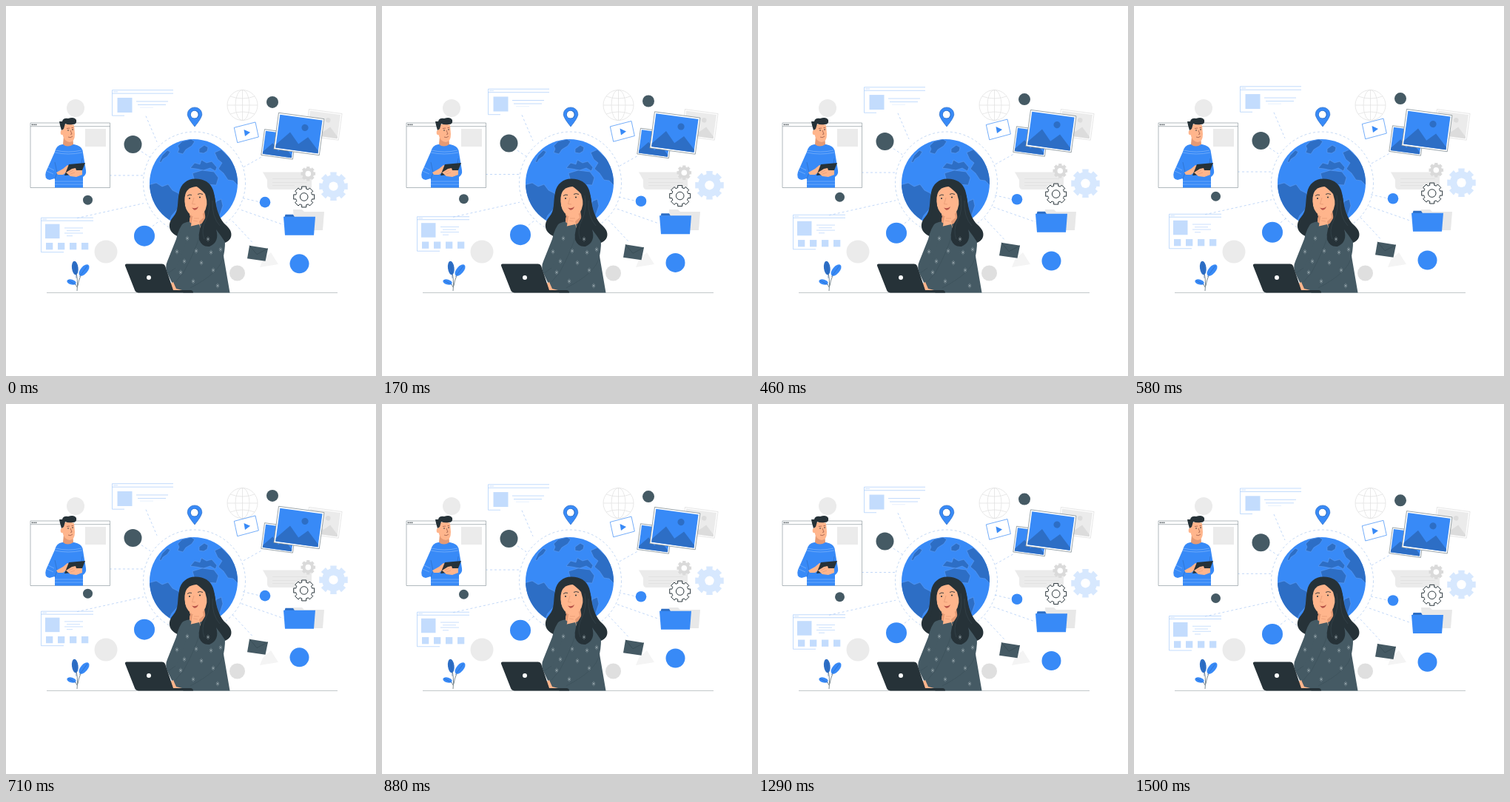
These frames come from a looping animation (500 by 500 pixels, 1.54 s). An HTML page with a canvas:

```html
<!DOCTYPE html>
<html lang="en">
<head>
<meta charset="utf-8">
<title>Connected world</title>
<style>
html, body { margin: 0; width: 100%; height: 100%; overflow: hidden; background: #fff; }
canvas { display: block; width: 500px; height: 500px; }
</style>
</head>
<body>
<canvas id="stage" width="500" height="500"></canvas>
<script>
const ctx = document.getElementById('stage').getContext('2d');
const LOOP = 1540, LOWEST = 1500, RISE = 6.5;
const BLUE = '#388af7', DEEP = '#2d6ec5', PALE = '#c3dcfd', MIST = '#d7e8fe', THIN = '#a8ccfb';
const SLATE = '#455a64', INK = '#263238', GREY = '#ebebeb', MID = '#dfdfdf';
const SKIN = '#ffb58c', SHADE = '#e59a74', WHITE = '#fff';

function paint(path, color, line, width = 0.7) {
  if (color) { ctx.fillStyle = color; ctx.fill(path); }
  if (line) { ctx.strokeStyle = line; ctx.lineWidth = width; ctx.stroke(path); }
}
const shape = (d, color, line, width) => paint(new Path2D(d), color, line, width);

function oval(x, y, rx, ry, turn, color, line, width) {
  const p = new Path2D();
  p.ellipse(x, y, rx, ry, turn, 0, Math.PI * 2);
  paint(p, color, line, width);
}
const disc = (x, y, r, color, line, width) => oval(x, y, r, r, 0, color, line, width);

function box(x, y, w, h, color, line, width) {
  const p = new Path2D();
  p.rect(x, y, w, h);
  paint(p, color, line, width);
}

function placed(x, y, angle, draw) {
  ctx.save();
  ctx.translate(x, y);
  ctx.rotate(angle);
  draw();
  ctx.restore();
}

function dashed(draw) {
  ctx.save();
  ctx.setLineDash([3, 3]);
  draw();
  ctx.restore();
}

function gear(x, y, r, hole, color, line) {
  const p = new Path2D();
  const root = r * 0.79, step = Math.PI / 4;
  for (let i = 0; i < 8; i++) {
    const a = i * step;
    for (const [turn, rad] of [[-0.26, root], [-0.22, r], [0.22, r], [0.26, root]])
      p.lineTo(Math.cos(a + turn) * rad, Math.sin(a + turn) * rad);
    p.arc(0, 0, root, a + 0.26, a + step - 0.26);
  }
  p.closePath();
  placed(x, y, 0, () => {
    ctx.lineJoin = 'round';
    paint(p, color, line, 1);
    disc(0, 0, hole, WHITE, line, 1);
  });
}

function photo(x, y, w, h, fill, hill, edge) {
  placed(x, y, 0.135, () => {
    box(0, 0, w, h, WHITE, edge, 0.7);
    const m = 1 + w * 0.018;
    const innerW = w - 2 * m, innerH = h - 2 * m;
    box(m, m, innerW, innerH, fill);
    ctx.translate(m, h - m);
    const at = (u, v) => `${u * innerW} ${-v * innerH}`;
    shape(`M${at(0, 0)}L${at(0, 0.1)}L${at(0.29, 0.52)}L${at(0.52, 0.2)}L${at(0.72, 0.44)}L${at(1, 0.08)}L${at(1, 0)}Z`, hill);
    disc(innerW * 0.62, -innerH * 0.71, w * 0.074, hill);
  });
}

function backdrop() {
  shape('M55 387.5H448', null, '#b3babd', 0.8);
  disc(94, 138, 12, GREY);
  disc(135, 332, 15.5, GREY);
  disc(312.5, 361, 10.5, MID);
  disc(319.5, 134, 20.5, null, MID, 0.7);
  oval(319.5, 134, 9.5, 20.5, 0, null, MID, 0.7);
  shape('M319.5 113.5V154.5M299 134H340M303 122Q319.5 128 336 122M303 146Q319.5 140 336 146', null, MID, 0.7);
  photo(409.5, 139.5, 45, 36, GREY, '#dcdcdc', '#dddddd');
  shape('M347 224.5H413V244Q413 248 409 248H358Q353 248 353 243V235Z', GREY);
  shape('M360 233.5H407M360 238.5H407M360 242.5H390', null, '#dfdfdf', 0.7);
  shape('M388 275H400L403 278H430L428 303H390Z', '#e8e8e8');
  shape('M358 333L368 349L343 353L347 343Z', '#f4f4f4');
  dashed(() => disc(254.5, 239, 69, null, '#b3cdf0', 0.8));
}

function globe() {
  ctx.save();
  disc(253.5, 239.5, 59.5, BLUE);
  const p = new Path2D();
  p.arc(253.5, 239.5, 59.5, 0, Math.PI * 2);
  ctx.clip(p);
  [
    'M232 189L238 183L250 180L255 183L251 189L243 194L239 200L232 198L234 193Z',
    'M207 211L211 202L218 195L222 197L218 203L212 207L210 211Z',
    'M192 242L203 239L211 244L219 241L225 249L233 253L237 260L233 273L224 283L219 294L207 282L195 262Z',
    'M261 193L268 188L273 191L272 196L267 199L261 198Z',
    'M249 219L255 212L262 214L264 208L271 212L278 210L285 218L283 223L276 219L267 222L257 220Z',
    'M252 226L265 222L281 224L287 232L284 242L256 240Z',
    'M282 198L291 194L306 209L314 225L315 244L307 236L300 235L294 226L287 220L292 212L286 207Z',
    'M284 264L291 261L293 270L288 285L283 278Z'
  ].forEach(d => shape(d, DEEP, '#66a3f7', 0.5));
  ctx.restore();
}

function locationPin() {
  shape('M255 163Q246 152 245.200 147C245.200 133.700 264.800 133.700 264.800 147Q264 152 255 163Z', BLUE, DEEP, 0.7);
  disc(255, 146.700, 5.800, DEEP);
  disc(254.700, 146.700, 4.900, WHITE);
}

function man() {
  box(33, 158, 107.5, 87.5, WHITE, '#7d8a90', 0.6);
  shape('M33 162.700H140.500', null, '#7d8a90', 0.6);
  [35.5, 38, 40.5].forEach(x => disc(x, 160.400, 0.8, INK));
  box(107, 166, 28, 24, GREY);
  shape('M76 187Q68 188 66 197L54 224Q51 234 59 235L66 233V245.500H104V231Q109 228 108 222L103.500 195Q102 189 92 187Z', BLUE);
  shape('M67 195Q84 199 102 195M66 198Q84 202 103 198M66 237H104M66 241H104', null, '#8dbcfa', 0.6);
  shape('M66 211L69 225L66 234M103 206L102 214', null, DEEP, 0.7);
  shape('M57 218L65 222M55 223L64 227', null, '#8dbcfa', 0.6);
  shape('M78 176L77 187Q83 192 91 187L90 175Z', SHADE);
  shape('M76 162Q82 157 92 161L93 173Q93 184 86 184Q78 183 76 172Z', SKIN);
  oval(76, 171, 2.300, 3.300, 0, SKIN);
  shape('M75 168L73 161L72 156L76 156Q77 151 84 152Q92 149 95 154Q96 160 90 160Q84 161 80 159L78 166Z', INK);
  disc(84, 168, 0.8, INK);
  disc(90, 167, 0.8, INK);
  shape('M82 165.500L86 165M88.500 164.500L91 164.500M87 168L89 173L87 173.500M84 177Q87 179 90 176', null, '#8f4f40', 0.7);
  shape('M68 225L77 220L83 215L88 217L84 223L77 228L70 228Z', SKIN);
  shape('M85 214L107 212L101 227L79 229Z', INK);
  shape('M81 225L89 220L94 219L95 222L103 222L103 228L95 231L87 230Z', SKIN);
  shape('M85 225L91 222M87 227L93 225', null, SHADE, 0.7);
}

function plant() {
  shape('M96 385Q98 369 93 352M97 378Q99 364 108 354M96 380Q94 374 86 372', null, SLATE, 0.7);
  oval(93.3, 354, 4.300, 9.300, -0.12, DEEP);
  oval(105.500, 357, 4.800, 9.300, 0.7, BLUE);
  oval(88.500, 373, 6.300, 3.500, 0.28, BLUE);
  shape('M93 348L95 368M110 351L99 366M84 371L95 377', null, '#245fae', 0.5);
}

function woman() {
  // Hair behind the shoulders, then body, face and front locks.
  shape('M256 233.500C246 233 236 240 234 252C231 266 234 276 226 285C217 295 220 307 234 312L290 321C303 320 307 311 303 303C299 295 287 291 285 278C283 267 283 259 280 249C276 238 268 234 256 233.500Z', INK);
  shape('M241 292Q234 298 230 315L218 345Q214 353 219 363L228 382L240 387.500H302.500L294 338Q300 308 288 296L262 290Z', SLATE);
  shape('M248 277L248 292Q260 301 270 289L267 270Z', SHADE);
  shape('M241 257Q244 245 257 244Q271 245 272 260Q272 277 263 284Q256 288 250 283Q242 276 241 265Z', SKIN);
  shape('M251 291L252 285L260 284L266 281L267 286L261 291L263 300L256 309L249 302Z', SKIN);
  shape('M254 287L261 287M253 290L259 291', null, SHADE, 0.7);
  shape('M248 298L261 295L265 306Q257 327 246 351L239 361L229 354Q242 331 248 298Z', SLATE);
  shape('M263 307Q255 333 240 360L229 373M229 354L219 361M294 338Q290 360 249 381', null, '#34495280', 0.7);
  shape('M258 240Q249 243 244 250Q240 258 242 270Q243 278 249 284L247 291L239 294L232 292Q238 274 235 257Q240 240 258 240Z', INK);
  shape('M252 240Q263 247 269 254Q275 272 269 287Q259 301 261 316Q265 326 275 325Q289 319 284 302Q291 311 296 319Q307 313 301 301Q286 287 283 264Q280 238 256 236Z', INK);
  shape('M274 256Q277 277 270 289Q263 303 268 315M279 263Q278 285 289 297', null, '#3d4c54', 0.5);
  disc(248, 260, 1, INK);
  disc(262, 258.500, 1, INK);
  shape('M245 256.500Q248 254 251 255.500M259 254.500Q262 252.500 266 254.500', null, INK, 0.9);
  shape('M254 259L251.500 267.500L256 268', null, SHADE, 0.8);
  shape('M251 272.500Q256 274.500 260 271Q258 276.500 254 275.500', '#b75348');
  const stars = [[245, 314], [231, 332], [241, 345], [257, 331], [273, 315], [264, 347],
    [280, 357], [253, 372], [286, 378], [277, 333], [236, 360], [290, 329]];
  for (const [x, y] of stars)
    placed(x, y, 0, () => shape('M-2.300 0H2.300M0-3.300V3.300M-1.800-1.800L1.800 1.800M1.800-1.800L-1.800 1.800', null, '#b9c5ca', 0.4));
}

function laptop() {
  shape('M220 376L226 373L230 382L238 384L222 386Z', SKIN);
  shape('M161 351Q160.500 348.500 163 348.500H211Q214 348.500 215 351L226 384H250Q253 384.500 253 387.500H179Q175 387 174 384Z', INK);
  disc(193, 367, 3, WHITE);
}

function panels() {
  shape('M226 114H143.500V148.500H160M143.500 118.500H226', null, THIN, 0.7);
  shape('M145 116.200H151', null, PALE, 0.8);
  box(150.500, 124.300, 20, 20, PALE);
  shape('M176 129.300H219M178 133.800H216', null, THIN, 0.7);
  shape('M181 137.500H199', null, MIST, 0.6);

  shape('M118 286.500H47.500V333H78M47.500 290.500H118', null, THIN, 0.7);
  shape('M49 288.500H55', null, PALE, 0.8);
  box(53, 295, 19.500, 19.500, PALE);
  shape('M79 300.300H104M82 304H100M79 307.300H104M82 311H90', null, THIN, 0.6);
  [54, 70, 86, 102].forEach(x => box(x, 320.300, 9.300, 9.300, PALE));
}

function links() {
  dashed(() => shape(
    'M140 229.300H187M189 149L204 184M96 287L186 267M183 197L195 205M198 298L207 291' +
    'M321 218L346 204M320 260L342 265M318 276L375 296M306 291L334 321', null, '#b3cff6', 0.8));
}

function floaters() {
  panels();
  disc(171.500, 187.300, 12, SLATE);
  disc(110.500, 262.500, 6.500, SLATE);
  disc(360, 130.300, 8, SLATE);
  disc(350, 265.500, 7.300, BLUE);
  disc(187, 311, 14, BLUE);
  disc(396.500, 348.700, 13, BLUE);

  shape('M308.300 164.700L337 157.300L341.300 177.300L312.700 185Z', WHITE, BLUE, 0.7);
  shape('M321.500 167.300L330 171.200L323 176.300Z', BLUE);

  photo(349.500, 167, 43, 35, BLUE, DEEP, '#78858c');
  photo(368.500, 144.600, 62, 49.5, BLUE, DEEP, '#78858c');

  gear(408.300, 227, 10, 3.800, '#dadada');
  gear(442.500, 244, 19.700, 6.200, MIST);
  gear(402.700, 258.300, 14.300, 5.300, WHITE, INK);

  shape('M376.500 285.500L377.500 282H388L390 285.500Z', DEEP);
  shape('M375 285H418L416 310H377Z', BLUE);

  shape('M329 324L354 328L350.500 345L326 341.500Z', SLATE);
  shape('M329 324L339 336L354 328', null, '#33474f', 0.6);
}

function frame(now) {
  const phase = ((now + LOOP - LOWEST) % LOOP) / LOOP;
  const lift = RISE * (1 - Math.abs(1 - 2 * phase));
  ctx.fillStyle = WHITE;
  ctx.fillRect(0, 0, 500, 500);
  backdrop();
  placed(0, -lift, 0, links);
  globe();
  locationPin();
  man();
  placed(0, -lift, 0, floaters);
  plant();
  woman();
  laptop();
  requestAnimationFrame(() => frame(performance.now()));
}
frame(0);
</script>
</body>
</html>
```
